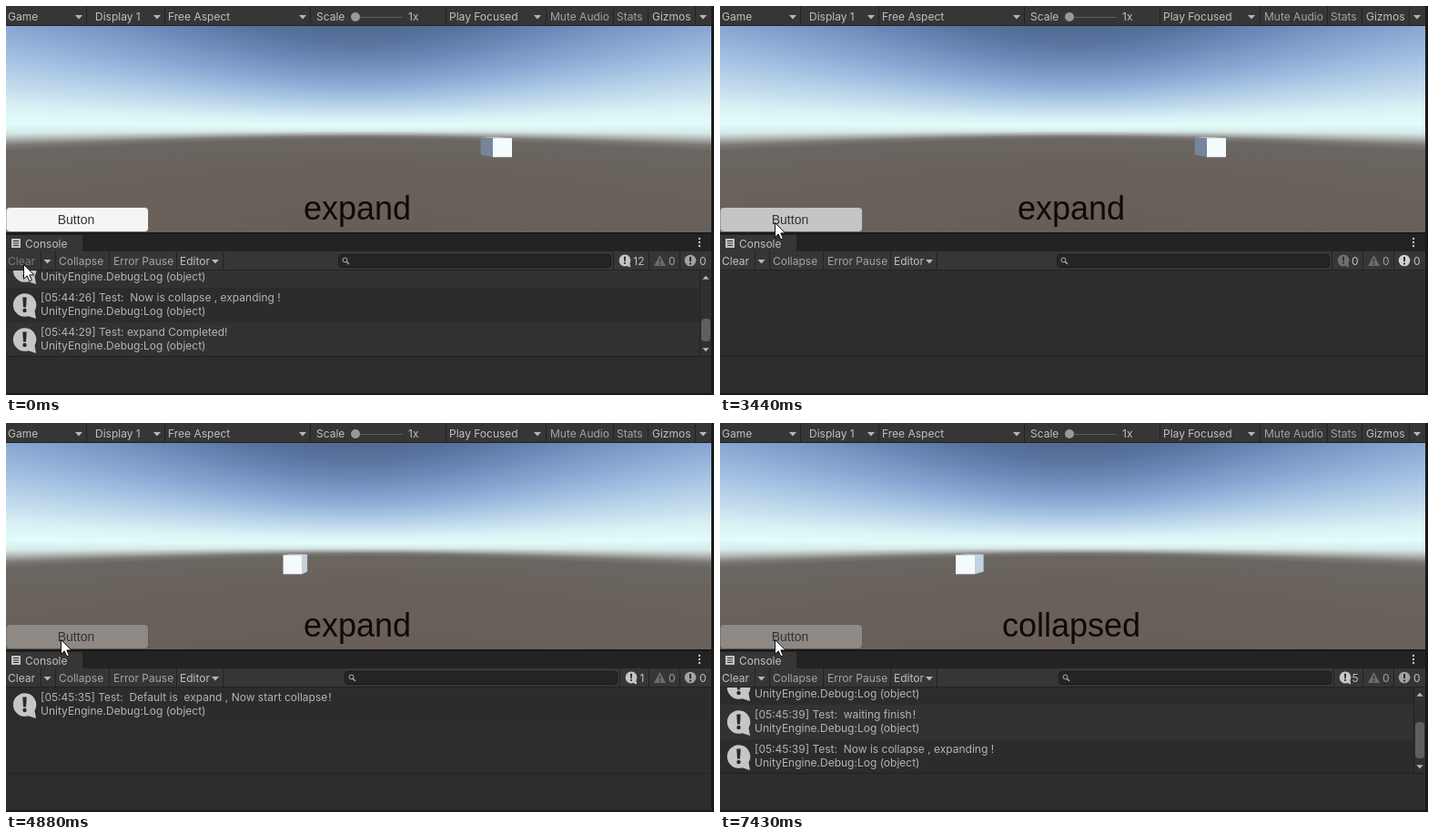
Write an HTML page with a canvas that moves like this. It is 778x428 px and loops after 8000 ms.

```html
<!DOCTYPE html>
<html lang="en">
<head>
<meta charset="utf-8">
<title>Game view and console</title>
<style>
  html, body { margin: 0; width: 100%; height: 100%; overflow: hidden; background: #191919; }
  canvas, svg { position: absolute; left: 0; top: 0; display: block; }
  text { font: 12px Inter, sans-serif; fill: #c0c0c0; white-space: pre; }
  .dim { fill: #a4a4a4; }
  .game text { font-family: "Liberation Sans", Arial, sans-serif; text-anchor: middle; fill: #0c0b0a; }
  .game .big { font-size: 36px; }
  .game .label { font-size: 14px; fill: #323232; }
  .log text { fill: #b4b4b4; }
  .end { text-anchor: end; }
  .rule { stroke: #222; fill: none; }
</style>
</head>
<body>
<canvas id="sky" width="778" height="428"></canvas>
<svg width="778" height="428" viewBox="0 0 778 428">
  <defs>
    <path id="tri" d="M-4-2H4L0 2.5Z" fill="#b8b8b8"/>
    <g id="bubble">
      <path d="M0-12.8A12.8 12.8 0 1 0 4 12.2L12.5 15 11 6.5A12.8 12.8 0 0 0 0-12.8Z" fill="#c6c6c6"/>
      <path d="M-2.2-8.5H2.2L1.5 2.5H-1.5Z" fill="#2a2a2a"/>
      <circle cy="6" r="2.2" fill="#2a2a2a"/>
    </g>
    <clipPath id="list"><path d="M0 291H775V385H0Z"/></clipPath>
  </defs>

  <g class="game">
    <g id="cube">
      <path id="side"/>
      <path id="top" fill="#e9f1f6"/>
      <path id="front" fill="#f4fbfd"/>
    </g>
    <text id="digit" class="big" x="386" y="184.5"></text>
    <text id="state" class="big" x="386" y="234.5"></text>
    <rect id="button" x="0" y="221.5" width="156.5" height="27" rx="4" stroke="#4d4844" stroke-opacity=".6"/>
    <text class="label" x="77" y="239.5">Button</text>
  </g>

  <!-- game toolbar -->
  <path d="M0 0H775V21H0Z" fill="#363636"/>
  <path class="rule" d="M0 21.5H775M88.5 0V21M174.5 0V21M334.5 0V21M483.5 0V21M593.5 0V21M667.5 0V21M705.5 0V21M757.5 0V21"/>
  <text x="2" y="16">Game</text><use href="#tri" x="80" y="12"/>
  <text x="98" y="16">Display 1</text><use href="#tri" x="166" y="12"/>
  <text x="178" y="16">Free Aspect</text><use href="#tri" x="326" y="12"/>
  <text x="341" y="16">Scale</text>
  <path d="M384 12.5H436" stroke="#5e5e5e"/>
  <circle cx="384" cy="12" r="5" fill="#999"/>
  <text x="442" y="16">1x</text>
  <text x="487" y="16">Play Focused</text><use href="#tri" x="584" y="12"/>
  <text class="dim" x="598" y="16">Mute Audio</text>
  <text class="dim" x="671" y="16">Stats</text>
  <text x="710" y="16">Gizmos</text><use href="#tri" x="766" y="12"/>

  <!-- console -->
  <path d="M0 249H775V270H0Z" fill="#232323"/>
  <path d="M0 249H775V251H0Z" fill="#191919"/>
  <path d="M0 252H84V270H0Z" fill="#363636"/>
  <path d="M6 256H16V266H6Z" fill="#c4c4c4"/>
  <path d="M8 258.5H14M8 261H14M8 263.5H14" stroke="#333"/>
  <text x="21" y="266">Console</text>
  <g fill="#c4c4c4"><circle cx="762" cy="256" r="1.2"/><circle cx="762" cy="260" r="1.2"/><circle cx="762" cy="264" r="1.2"/></g>
  <path d="M0 270H775V290H0Z" fill="#363636"/>
  <path d="M0 291H775V426H0Z" fill="#2d2d2d"/>
  <path class="rule" d="M0 290.5H775M0 385.5H775M38.5 270V290M54.5 270V290M113.5 270V290M187.5 270V290M238.5 270V290M706.5 270V290M740.5 270V290"/>
  <text id="clear" x="2" y="285">Clear</text><use href="#tri" x="45.5" y="281"/>
  <text class="dim" x="58" y="285">Collapse</text>
  <text class="dim" x="118" y="285">Error Pause</text>
  <text x="191" y="285">Editor</text><use href="#tri" x="230" y="281"/>

  <g id="search">
    <rect x=".5" y="273.5" width="299" height="14" rx="3" fill="#252525" stroke="#191919"/>
    <circle cx="7.5" cy="279.5" r="2.4" fill="none" stroke="#b4b4b4"/>
    <path d="M9.2 281.2L12 284" stroke="#b4b4b4" stroke-width="1.3"/>
    <path class="rule" d="M302.5 270V290"/>
    <use id="info" href="#bubble" transform="translate(315 280) scale(.5)"/>
  </g>
  <text id="count" class="end" x="701.5" y="285"></text>
  <path d="M718.5 274L725 286H712Z" fill="#6c6c6c"/>
  <path d="M718.5 278V282M718.5 283V285" stroke="#333" stroke-width="1.4"/>
  <text class="dim end" x="735.5" y="285">0</text>
  <circle id="error" cx="752" cy="280" r="6.3"/>
  <path d="M752 276V281M752 282.5V284.5" stroke="#2a2a2a" stroke-width="2"/>
  <text class="end" x="769.5" y="285">0</text>

  <g id="log" class="log" clip-path="url(#list)"></g>
  <g id="bar">
    <path d="M762 291H775V385H762Z" fill="#303030"/>
    <path class="rule" d="M762.5 291V385"/>
    <use href="#tri" transform="translate(769 299) scale(.9 -.9)"/>
    <use href="#tri" transform="translate(769 378) scale(.9)"/>
    <rect id="thumb" x="764" width="10" rx="4" fill="#5f5f5f"/>
  </g>
  <path d="M0 426H778V428H0ZM775 0H778V428H775Z" fill="#191919"/>

  <path id="cursor" d="M.5.5V16.3L4.2 12.9 6.9 18.8 9.4 17.7 6.8 11.9H11.8Z" fill="#fff" stroke="#111"/>
</svg>

<script>
const $ = id => document.getElementById(id);
const LOOP = 8000;
const EYE = { x: 387, y: 135.5, f: 196.6 };

// Vertical offsets from eye level on the middle column, with colours.
const SKY = [
  [-114, '#526a92'], [-95, '#58739e'], [-75, '#6a88b7'], [-52, '#86a5d1'],
  [-35, '#a4c2e2'], [-20, '#c5deee'], [-10, '#dcf3f6'], [-3, '#e1fcfa'],
  [2, '#d5e9e7'], [5, '#aeb5b3'], [8, '#7c7976'], [11, '#6b6662'], [40, '#69615b'], [114, '#685e57']
];

function drawSky() {
  const c = $('sky').getContext('2d');
  for (let x = 0; x < 775; x++) {
    const k = Math.hypot(1, (x - EYE.x) / EYE.f);
    const g = c.createLinearGradient(0, EYE.y - 114 * k, 0, EYE.y + 114 * k);
    for (const [d, color] of SKY) g.addColorStop((d + 114) / 228, color);
    c.fillStyle = g;
    c.fillRect(x, 22, 1, 228);
  }
}

// Last entry whose start time has been reached.
const pick = (list, t) => list.findLast(e => e[0] <= t);

const CURSOR = [
  [0, 19, 284], [360, 150, 251], [480, 328, 270], [630, 285, 238], [750, 180, 216],
  [880, 74, 235], [1030, 210, 212], [1150, 342, 188], [1540, 165, 206], [1660, 6, 238],
  [1810, -99, 0], [2460, 31, 248], [2580, 47, 244], [2700, 60, 238]
];
const BUTTON = [[0, '#f5f5f5'], [3440, '#c5c5c5'], [3560, '#8e8985']];
const STATE = [[0, 'expand'], [5420, 'collapsed']];
const DIGIT = [[0, ''], [5420, '2'], [5920, '1'], [6950, '0'], [7430, '']];

// start, message count, search x, thumb height, latest messages
const LOGS = [
  [0, 12, 365, 25, ['', '[05:44:26] Test:  Now is collapse , expanding !', '[05:44:29] Test: expand Completed!']],
  [120, 0, 370, 0, []],
  [3560, 1, 372, 0, ['[05:45:35] Test:  Default is  expand , Now start collapse\u200a!']],
  [5670, 3, 370, 55, ['', '[05:45:37] Test:  collapse Completed , clip name = Collapse\u200a!', '[05:45:37] Test:  wait for 2 second\u200a!']],
  [7430, 5, 372, 40, ['', '[05:45:39] Test:  waiting finish\u200a!', '[05:45:39] Test:  Now is collapse , expanding !']]
];

let shown;
function drawLog(entry) {
  if (entry === shown) return;
  shown = entry;
  const [, count, x, thumb, lines] = entry;
  const scroll = Math.max(0, count * 38 - 95);
  $('log').innerHTML = lines.map((line, i) => {
    const n = count - lines.length + i, y = 291 + n * 38 - scroll;
    return `<rect y="${y}" width="775" height="38" fill="${n % 2 ? '#323232' : '#2c2c2c'}"/>
      <use href="#bubble" x="20.5" y="${y + 19}"/>
      <text x="38" y="${y + 15}">${line}</text>
      <text x="38" y="${y + 30}">UnityEngine.Debug:Log (object)</text>`;
  }).join('');
  $('search').setAttribute('transform', `translate(${x})`);
  $('info').setAttribute('opacity', count ? 1 : .4);
  $('count').textContent = count;
  $('error').setAttribute('fill', count ? '#a2a2a2' : '#d0d0d0');
  $('bar').style.display = thumb ? '' : 'none';
  $('thumb').setAttribute('y', 369 - thumb);
  $('thumb').setAttribute('height', thumb);
}

// The cube slides with a smooth ease, refreshed on these ticks.
const TICKS = [0, 3560, 3680, 3830, 3980, 4100, 4250, 4370, 4490, 4610, 4730, 4880, 5000, 5150, 5300, 5420].map(t => [t]);
const SIZE = 21, DEPTH = .91;
const quad = (...p) => 'M' + p.map(q => q.join(' ')).join('L') + 'Z';
const back = ([x, y]) => [EYE.x + (x - EYE.x) * DEPTH, EYE.y + (y - EYE.y) * DEPTH];

function drawCube(t) {
  const u = Math.min(1, Math.max(0, (pick(TICKS, t)[0] - 3455) / 1920));
  const l = 535 - 276 * u * u * (3 - 2 * u), r = l + SIZE, y = 145.3, b = y + SIZE;
  const right = l > EYE.x, s = right ? l : r;
  $('front').setAttribute('d', quad([l, y], [r, y], [r, b], [l, b]));
  $('top').setAttribute('d', quad([l, y], [r, y], back([r, y]), back([l, y])));
  $('side').setAttribute('d', quad([s, y], [s, b], back([s, b]), back([s, y])));
  $('side').setAttribute('fill', right ? '#76859b' : '#c3d2e1');
}

function draw(t) {
  const [, x, y] = pick(CURSOR, t);
  $('cursor').setAttribute('transform', `translate(${x} ${y})`);
  $('button').setAttribute('fill', pick(BUTTON, t)[1]);
  $('state').textContent = pick(STATE, t)[1];
  $('digit').textContent = pick(DIGIT, t)[1];
  $('clear').style.fill = t < 240 ? '#7c7c7c' : '';
  drawLog(pick(LOGS, t));
  drawCube(t);
}

drawSky();
const start = performance.now();
function loop() {
  draw((performance.now() - start) % LOOP);
  requestAnimationFrame(loop);
}
loop();
</script>
</body>
</html>
```
